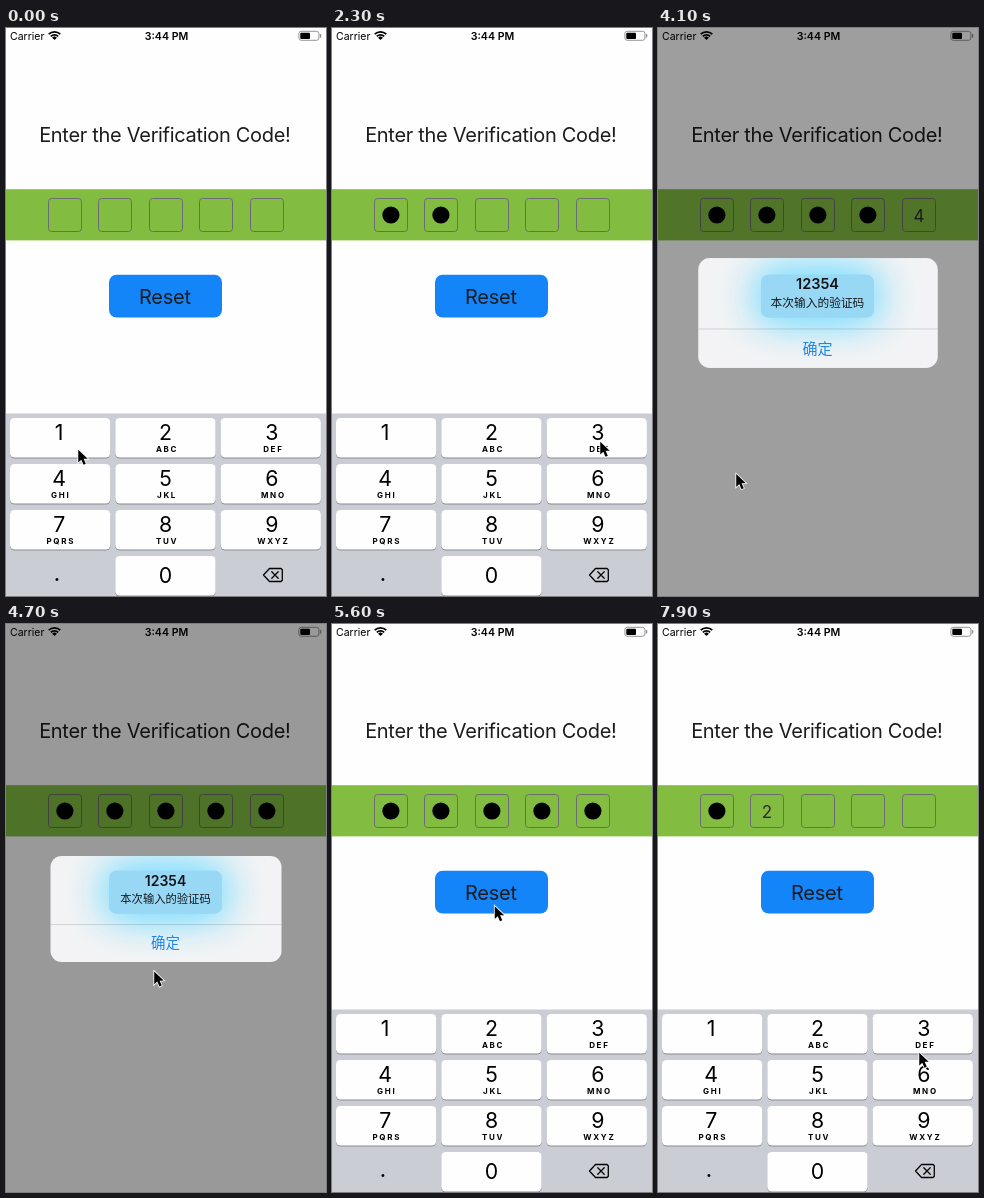
An HTML page with a canvas for the animation above (8000 ms loop, 320 px wide and 568 px high).

```html
<!DOCTYPE html>
<html lang="en">
<head>
<meta charset="utf-8">
<title>Verification code</title>
<style>
html, body { margin: 0; width: 100%; height: 100%; overflow: hidden; background: #fefefe; }
canvas { display: block; width: 320px; height: 568px; }
</style>
</head>
<body>
<canvas id="stage"></canvas>
<script>
const W = 320, H = 568, LOOP = 8000;
const SANS = 'Inter, Roboto, sans-serif';
const CJK = '"Noto Sans CJK SC", "Noto Sans CJK", sans-serif';
const LETTERS = ' ABC DEF GHI JKL MNO PQRS TUV WXYZ'.split(' ');
const ALERT_IN = 3760, MASK_DELAY = 700;
const ARRIVE = 120, LINGER = 190;

// Pointer visits: a digit types it, an empty tap only passes by
const VISITS = [
  { at: 350, x: 71, y: 420, tap: 1 },
  { at: 1150, x: 168, y: 417, tap: 2 },
  { at: 2400, x: 267, y: 412, tap: 3 },
  { at: 3100, x: 165, y: 449, tap: 5 },
  { at: 3700, x: 68, y: 457, tap: 4 },
  { at: 5140, x: 166, y: 319, tap: 'ok' },
  { at: 5850, x: 160, y: 268, tap: 'reset' },
  { at: 6600, x: 151, y: 440, tap: '' },
  { at: 7050, x: 72, y: 414, tap: 1 },
  { at: 7550, x: 160, y: 414, tap: 2 },
  { at: 8010, x: 260, y: 427, tap: '' }
];
const ALERT_OUT = VISITS.find(v => v.tap === 'ok').at;

const canvas = document.getElementById('stage');
const ctx = canvas.getContext('2d');
const dpr = window.devicePixelRatio || 1;
canvas.width = W * dpr;
canvas.height = H * dpr;

const ramp = (t, start, span) => Math.max(0, Math.min(1, (t - start) / span));
const smooth = p => p * p * (3 - 2 * p);
const easeOut = p => 1 - (1 - p) ** 3;
const mix = (a, b, p) => a + (b - a) * p;
const isDigit = v => typeof v.tap === 'number';

function text(str, x, y, size, { color = '#000', weight = 400, gap = 0, align = 'center', family = SANS } = {}) {
  ctx.font = `${weight} ${size}px ${family}`;
  ctx.letterSpacing = gap + 'px';
  ctx.textAlign = align;
  ctx.fillStyle = color;
  ctx.fillText(str, x + (align === 'center' ? gap / 2 : 0), y);
}

function box(x, y, w, h, r) {
  ctx.beginPath();
  ctx.roundRect(x, y, w, h, r);
}

function fillBox(x, y, w, h, r, color) {
  box(x, y, w, h, r);
  ctx.fillStyle = color;
  ctx.fill();
}

function drawStatus() {
  text('Carrier', 4, 12, 10.5, { align: 'left' });
  text('3:44 PM', 160.5, 12, 10.6, { weight: 600 });
  ctx.strokeStyle = ctx.fillStyle = '#000';
  ctx.lineWidth = 1.7;
  for (let r = 8.2; r > 2; r -= 3) {
    ctx.beginPath();
    ctx.arc(48.5, 12, r, -Math.PI * 0.75, -Math.PI * 0.25);
    ctx.stroke();
  }
  ctx.beginPath();
  ctx.moveTo(48.5, 12);
  ctx.arc(48.5, 12, 3.2, -Math.PI * 0.75, -Math.PI * 0.25);
  ctx.fill();
  box(292.9, 3.3, 20, 9, 2.3);
  ctx.strokeStyle = '#8a8a8a';
  ctx.lineWidth = 0.9;
  ctx.stroke();
  fillBox(294.3, 4.7, 9.7, 6.2, 1, '#000');
  fillBox(313.9, 6, 1.3, 3.6, 0.6, '#8a8a8a');
}

function typedAt(t) {
  const past = VISITS.filter(v => v.at <= t);
  const cleared = past.findIndex(v => v.tap === 'reset');
  return past.slice(cleared + 1).filter(isDigit);
}

function drawSlots(t) {
  ctx.fillStyle = '#82bd41';
  ctx.fillRect(0, 161.2, W, 51.2);
  const typed = typedAt(t);
  for (let i = 0; i < 5; i++) {
    const x = Math.round(42 + i * 50.4) + 0.5;
    box(x, 170.5, 33, 33, 3);
    ctx.strokeStyle = '#6c6c70';
    ctx.lineWidth = 1;
    ctx.stroke();
    const entry = typed[i];
    if (!entry) continue;
    if (t < entry.at + MASK_DELAY) {
      text(entry.tap, x + 16.4, 193.5, 17, { color: '#2b2b2b' });
    } else {
      ctx.beginPath();
      ctx.arc(x + 16.4, 187, 8.6, 0, Math.PI * 2);
      ctx.fillStyle = '#000';
      ctx.fill();
    }
  }
}

function drawPage(t) {
  ctx.fillStyle = '#fefefe';
  ctx.fillRect(0, 0, W, H);
  drawStatus();
  text('Enter the Verification Code!', 159, 113.5, 20, { color: '#1c1c1e', gap: -0.3 });
  drawSlots(t);
  fillBox(103, 246.7, 113, 42.7, 7.5, '#1485f8');
  text('Reset', 159, 275.6, 20, { color: '#1c1c1e', gap: -0.2 });
}

function drawAlert(t) {
  const leave = ramp(t, ALERT_OUT, 360);
  if (t < ALERT_IN || leave === 1) return;
  const dim = 0.4 * ramp(t, ALERT_IN, 360) * (1 - leave);
  ctx.fillStyle = `rgba(0,0,0,${dim})`;
  ctx.fillRect(0, 0, W, H);

  const scale = 1.2 - 0.2 * smooth(ramp(t, ALERT_IN, 470));
  ctx.save();
  ctx.globalAlpha = ramp(t, ALERT_IN, 220) * (1 - leave);
  ctx.translate(160, 285);
  ctx.scale(scale, scale);
  box(-115.5, -53, 231, 106, 11);
  ctx.clip();
  ctx.fillStyle = '#f3f3f5';
  ctx.fillRect(-116, -53, 232, 106);

  // The button shines through the panel and keeps its own size
  ctx.save();
  ctx.scale(1 / scale, 1 / scale);
  ctx.shadowColor = 'rgb(125,222,255)';
  ctx.shadowBlur = 42 * dpr;
  for (let i = 0; i < 2; i++) fillBox(-57, -38.3, 113, 42.7, 7.5, '#98d8f5');
  ctx.restore();

  ctx.fillStyle = 'rgba(60,70,80,0.22)';
  ctx.fillRect(-116, 15, 232, 0.8);
  text('12354', -0.5, -22.7, 14, { weight: 600, color: '#101418' });
  text('本次输入的验证码', -0.5, -5.8, 11.3, { family: CJK, color: '#15191d' });
  text('确定', -0.5, 39.4, 14.5, { family: CJK, color: '#1f86e8' });
  ctx.restore();
}

function drawKey(digit, held) {
  const col = digit ? (digit - 1) % 3 : 1;
  const row = digit ? Math.floor((digit - 1) / 3) : 3;
  const x = 4 + col * 105.3, y = 390 + row * 46, mid = 53.2 + col * 106.3;
  fillBox(x, y + 1, 100.3, 39.6, 4.5, '#898c92');
  fillBox(x, y, 100.3, 39.6, 4.5, held ? '#b6bac3' : '#fefefe');
  text(digit, mid, y + (digit ? 21.6 : 27), 21.3);
  if (digit) text(LETTERS[digit - 1], mid + 0.7, y + 33.6, 8, { weight: 700, gap: 1.7 });
}

function drawDeleteIcon() {
  ctx.strokeStyle = '#000';
  ctx.lineWidth = 1.3;
  ctx.lineJoin = ctx.lineCap = 'round';
  ctx.stroke(new Path2D('M257.5 547l6-6.5h11.5l1.3 1.3v10.4l-1.3 1.3h-11.5zM265.8 543.8l6.4 6.4m0-6.4l-6.4 6.4'));
}

function drawKeyboard(t) {
  const hide = t < ALERT_OUT ? smooth(ramp(t, 3720, 330)) : 1 - easeOut(ramp(t, ALERT_OUT + 32, 380));
  if (hide === 1) return;
  ctx.save();
  ctx.translate(0, 183 * hide);
  ctx.fillStyle = '#cacdd3';
  ctx.fillRect(0, 385.5, W, 183);
  const press = VISITS.find(v => isDigit(v) && t >= v.at && t < v.at + 100);
  for (let d = 0; d <= 9; d++) drawKey(d, press && press.tap === d && d > 1);
  text('.', 51, 552.5, 21, { weight: 500 });
  drawDeleteIcon();
  ctx.restore();
}

function drawPointer(t) {
  const i = VISITS.findIndex(v => v.at > t);
  const to = VISITS[i], from = VISITS[i - 1] || to;
  const leave = from.at + LINGER;
  const p = smooth(ramp(t, leave, to.at - ARRIVE - leave));
  ctx.save();
  ctx.translate(mix(from.x, to.x, p) + 0.8, mix(from.y, to.y, p) + 1.2);
  ctx.scale(0.92, 0.92);
  const arrow = new Path2D('M.5 .5v14l3.3-3.1 2.4 5.6 2.5-1.1-2.4-5.4 4.5-.2z');
  ctx.lineJoin = 'miter';
  ctx.lineWidth = 1.7;
  ctx.strokeStyle = '#fff';
  ctx.stroke(arrow);
  ctx.fillStyle = '#000';
  ctx.fill(arrow);
  ctx.restore();
}

const start = performance.now();

function frame() {
  const t = (performance.now() - start) % LOOP;
  ctx.setTransform(dpr, 0, 0, dpr, 0, 0);
  drawPage(t);
  drawAlert(t);
  drawKeyboard(t);
  drawPointer(t);
  requestAnimationFrame(frame);
}
frame();
</script>
</body>
</html>
```
